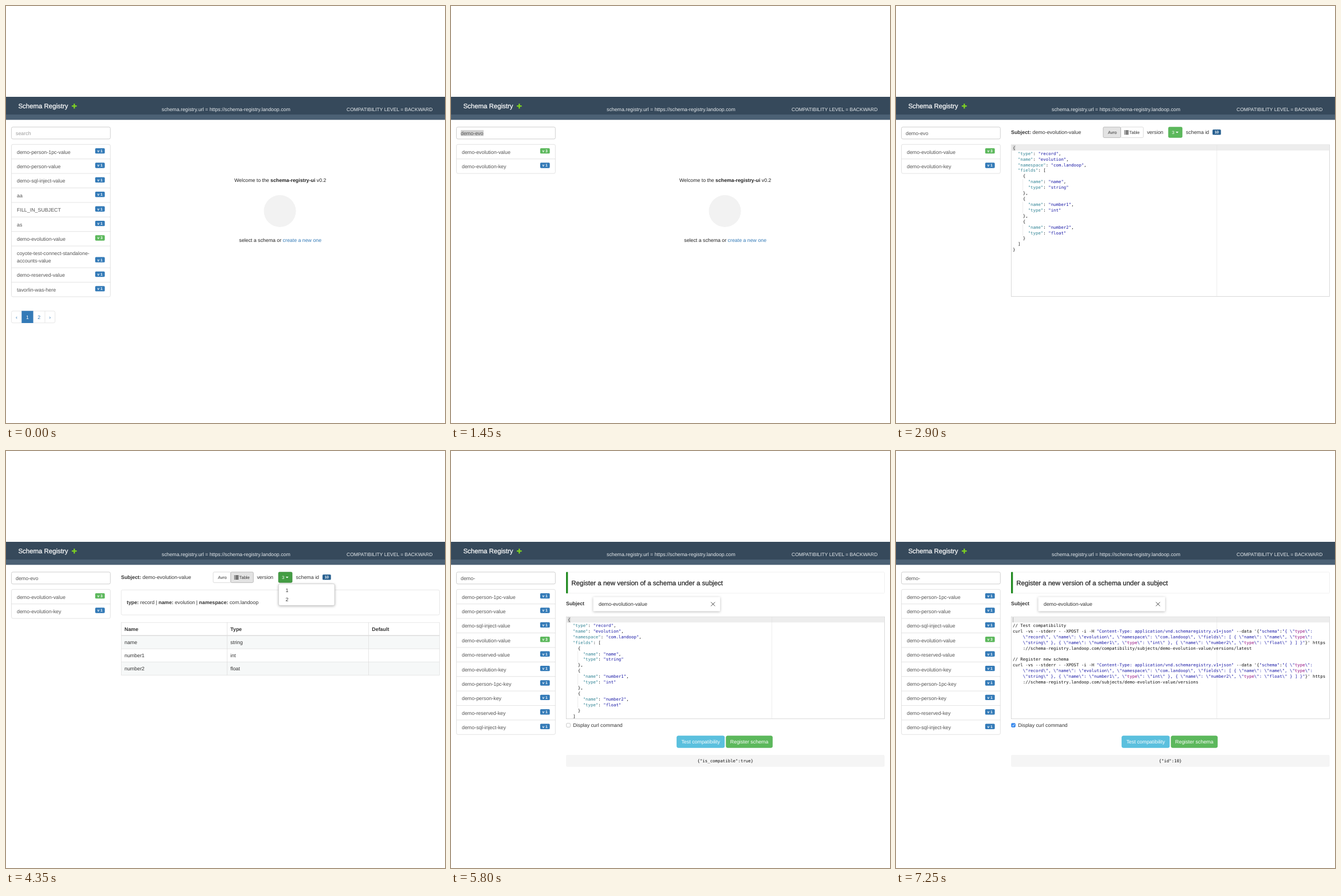
Animation, 767 px wide and 730 px high, one loop 8.7 s. Source, as an HTML page:

```html
<!DOCTYPE html>
<html lang="en">
<head>
<meta charset="utf-8">
<title>Schema Registry</title>
<style>
  html, body { margin: 0; width: 100%; height: 100%; overflow: hidden; background: #fff; }
  svg { display: block; width: 767px; height: 730px; }
  text {
    font-family: "Liberation Sans", Arial, sans-serif;
    text-rendering: geometricPrecision;
    white-space: pre;
  }
  .mono { font-family: "DejaVu Sans Mono", monospace; }
  .b { font-weight: bold; }
  .medium { stroke-width: .25px; }
  .key { fill: #318495; }
  .str { fill: #1a1aa6; }
  .word { fill: #930f80; }
  .link { fill: #337ab7; }
  .pop { filter: drop-shadow(0 1.5px 2px rgba(0, 0, 0, .28)); }
</style>
</head>
<body>
<svg id="stage" viewBox="0 0 767 730"></svg>
<script>
const STEP = 1450;
const BLUE = '#337ab7', GREEN = '#5cb85c', GREY = '#555', DARK = '#333';
const LEFT = 201, RIGHT = 757.5, MID = 479;
const ROW = 25.4, LINE = 9.917, CHAR = 4.445, MONO = 7.384;

const rect = (x1, y1, x2, y2, fill, stroke = 'none', r = 0, extra = '') =>
  `<rect x="${x1}" y="${y1}" width="${x2 - x1}" height="${y2 - y1}" rx="${r}" fill="${fill}" stroke="${stroke}" stroke-width=".7" ${extra}/>`;

const path = (d, stroke, width = .7, fill = 'none') =>
  `<path d="${d}" fill="${fill}" stroke="${stroke}" stroke-width="${width}"/>`;

const text = (x, y, s, { size = 8.89, fill = DARK, cls = '', anchor = 'start', extra = '' } = {}) =>
  `<text x="${x}" y="${y}" font-size="${size}" fill="${fill}" class="${cls}" text-anchor="${anchor}" ${extra}>${s}</text>`;

const span = (cls, s) => `<tspan class="${cls}">${s}</tspan>`;
const bold = s => span('b', s);
const mono = (x, y, s, anchor) => text(x, y, s, { size: MONO, fill: '#111', cls: 'mono', anchor });

const badge = (x1, x2, cy, s, fill) =>
  rect(x1, cy - 4.7, x2, cy + 4.7, fill, 'none', 1.6) +
  text((x1 + x2) / 2, cy + 2.4, s, { size: 6.67, fill: '#fff', cls: 'b', anchor: 'middle' });

function header() {
  return rect(0, 159, 767, 190, '#36495b') + rect(0, 190, 767, 199.3, '#4b6074') +
    text(21.5, 178.6, 'Schema Registry', { size: 11.43, fill: '#fff', cls: 'medium', extra: 'stroke="#fff"' }) +
    path('M115 175.2H123.6M119.3 170.9V179.5', '#7ed321', 2.3) +
    text(272, 184, 'schema.registry.url = https://schema-registry.landoop.com', { size: 8.8, fill: '#e8ecef' }) +
    text(745.3, 184, 'COMPATIBILITY LEVEL = BACKWARD', { size: 8.5, fill: '#e8ecef', anchor: 'end' });
}

function search(value, selected) {
  return rect(9.5, 211.9, 182.3, 232.8, '#fff', '#bbb', 2.5) +
    (selected ? rect(17, 217.3, 57, 227.6, '#d0d0d0') : '') +
    text(17, 225.7, value || 'search', { fill: value ? GREY : '#999' });
}

// Each subject may hold a line break; subjects in `versions` have a version other than 1.
function subjects(names, versions = {}) {
  let y = 242.3, body = '', rules = '';
  names.forEach((name, i) => {
    if (i) rules += `M9.5 ${y}H182.3`;
    const lines = name.split('\n');
    lines.forEach((s, k) => { body += text(19, y + 16.2 + k * 12.7, s, { fill: GREY }); });
    const v = versions[name] || 1;
    body += badge(155.8, 172.6, y + 11.3 + (lines.length - 1) * 12.7, 'v ' + v, v > 1 ? GREEN : BLUE);
    y += ROW + (lines.length - 1) * 12.7;
  });
  return rect(9.5, 242.3, 182.3, y, '#fff', '#d6d6d6', 2.5) + path(rules, '#d9d9d9') + body;
}

function pager() {
  const edges = [9.5, 27.3, 47.6, 68, 85.7];
  return rect(9.5, 534, 85.7, 554.7, '#fff', '#ddd', 2.5) +
    path('M68 534V554.7', '#ddd') + rect(27.3, 533.7, 47.6, 555, BLUE) +
    ['‹', '1', '2', '›'].map((s, i) => text((edges[i] + edges[i + 1]) / 2, 547.8, s,
      { fill: i === 1 ? '#fff' : BLUE, anchor: 'middle' })).join('');
}

function welcome() {
  return text(MID + .2, 307.9, `Welcome to the ${bold('schema-registry-ui')} v0.2`, { size: 8.75, fill: '#222', anchor: 'middle' }) +
    '<circle cx="478.5" cy="359" r="28" fill="#f2f2f2"/>' +
    text(MID + .2, 413, `select a schema or ${span('link', 'create a new one')}`, { size: 8.8, fill: '#222', anchor: 'middle' });
}

function toolbar(tableOn) {
  const button = (x1, x2, on) => rect(x1, 211.9, x2, 230.4, on ? '#e3e3e3' : '#fff', on ? '#a5a5a5' : '#ccc', 1.8);
  const avro = button(362, 392.6, !tableOn), table = button(392.6, 432.2, tableOn);
  const rows = [218.3, 220.3, 222.3, 224.3];
  return text(LEFT, 224.4, `${bold('Subject:')} demo-evolution-value`) +
    (tableOn ? avro + table : table + avro) +
    text(378, 223.8, 'Avro', { size: 7.62, anchor: 'middle' }) +
    path(rows.map(y => `M398.8 ${y}h1.5M401 ${y}h5.4`).join(''), DARK, 1.3) +
    text(407.6, 223.8, 'Table', { size: 7.62 }) +
    text(438.4, 224.4, 'version') +
    rect(476, 212, 500, 230.3, tableOn ? '#449d44' : GREEN, tableOn ? '#398439' : '#4cae4c', 1.8) +
    text(482, 223.8, '3', { size: 7.62, fill: '#fff' }) +
    path('M488.6 220h5l-2.5 2.6z', 'none', 0, '#fff') +
    text(506.6, 224.4, 'schema id') + badge(553, 567.7, 220.9, '10', '#286090');
}

const editor = (top, bottom, content) =>
  rect(LEFT + .3, top, RIGHT, bottom, '#fff', '#c8c8c8') +
  rect(LEFT + .6, top + .4, RIGHT - .3, top + 10, '#ededed') +
  path(`M560.6 ${top}V${bottom}`, '#e4e4e4') + content;

const field = (name, type) => ['    {', `      "name": "${name}",`, `      "type": "${type}"`, '    },'];
const schema = [
  '{', '  "type": "record",', '  "name": "evolution",', '  "namespace": "com.landoop",', '  "fields": [',
  ...field('name', 'string'), ...field('number1', 'int'), ...field('number2', 'float'), '  ]', '}'
];
schema[16] = '    }';

const paintJson = s => s.replace(/"[^"]*"(:?)/g, (m, colon) =>
  colon ? span('key', m.slice(0, -1)) + ':' : span('str', m));

function schemaCode(top, count) {
  const lines = schema.slice(0, count);
  const guides = lines.map((s, i) => s.startsWith('      ') ? `M221.6 ${top + .5 + i * LINE}v${LINE}` : '').join('');
  return rect(204, top + 1, 208.4, top + 9.6, 'none', '#c0c0c0') + path(guides, '#ddd', .6) +
    lines.map((s, i) => {
      const code = s.trimStart();
      return mono(204 + (s.length - code.length) * CHAR, top + 7.8 + i * LINE, paintJson(code));
    }).join('');
}

function curlCode(top) {
  const quoted = s => span('str', s.replace(/type(?=\\)/g, span('word', 'type')));
  const call = end => [
    [0, `curl -vs --stderr - -XPOST -i -H ${span('str', '"Content-Type: application/vnd.schemaregistry.v1+json"')} --data '{` +
      `${span('str', '"schema"')}:${quoted(String.raw`"{ \"type\":`)}`],
    [4, quoted(String.raw`\"record\", \"name\": \"evolution\", \"namespace\": \"com.landoop\", \"fields\": [ { \"name\": \"name\", \"type\":`)],
    [4, quoted(String.raw`\"string\" }, { \"name\": \"number1\", \"type\": \"int\" }, { \"name\": \"number2\", \"type\": \"float\" } ] }"`) + `}' https`],
    [4, '://schema-registry.landoop.com' + end]
  ];
  const lines = [
    [0, ''], [0, '// Test compatibility'], ...call('/compatibility/subjects/demo-evolution-value/versions/latest'),
    [0, ''], [0, '// Register new schema'], ...call('/subjects/demo-evolution-value/versions')
  ];
  return path(`M204.6 ${top + .8}v9`, '#999') +
    lines.map(([col, s], i) => mono(204 + col * CHAR, top + 7.8 + i * LINE, s)).join('');
}

function table() {
  const cols = [LEFT + 6, 392, 639.3];
  const data = [['name', 'string'], ['number1', 'int'], ['number2', 'float']];
  const row = (cells, y, cls) => cells.map((s, i) => text(cols[i], y, s, { cls })).join('');
  return rect(LEFT + .3, 243.2, RIGHT, 287, '#fff', '#ddd', 2.5) +
    text(211, 268.3, `${bold('type:')} record | ${bold('name:')} evolution | ${bold('namespace:')} com.landoop`, { size: 8.8 }) +
    rect(LEFT, 323, RIGHT, 346.3, '#f6f8f8') + rect(LEFT, 369.3, RIGHT, 392.3, '#f6f8f8') +
    rect(LEFT + .3, 300.2, RIGHT, 392.3, 'none', '#ddd') +
    path('M201 346.3H757.5M201 369.3H757.5M386.4 300V392.3M633.5 300V392.3', '#ddd') +
    path('M201 323H757.5', '#ddd', 1.3) +
    row(['Name', 'Type', 'Default'], 314.7, 'b') +
    data.map((cells, i) => row(cells, 338.2 + i * 23)).join('');
}

const menu = () =>
  rect(476.2, 232.6, 574.2, 270.4, '#fff', '#c4c4c4', 2.5, 'class="pop"') +
  text(488.6, 247, '1') + text(488.6, 262.8, '2');

function register(content, checked, reply) {
  const button = (x1, x2, fill, stroke, s) => rect(x1, 498.8, x2, 519.3, fill, stroke, 2.5) +
    text((x1 + x2) / 2, 512.2, s, { fill: '#fff', anchor: 'middle' });
  return rect(LEFT + .3, 212, RIGHT, 249, '#fff', '#eaeaea', 1.8) + rect(LEFT, 211.8, 204.3, 249.2, '#228b22', 'none', 1) +
    text(210.3, 234.6, 'Register a new version of a schema under a subject',
      { size: 11.5, fill: '#222', cls: 'medium', extra: 'stroke="#222"' }) +
    text(LEFT, 269.6, 'Subject', { cls: 'b' }) +
    rect(248.5, 255.4, 470.2, 280.6, '#fff', 'none', 1, 'class="pop"') +
    text(258, 271.3, 'demo-evolution-value') +
    path('M454.2 264.5l7 7m0-7l-7 7', '#444', 1) +
    editor(290.2, 468.8, content) +
    rect(201.6, 476.7, 208.4, 483.4, checked ? '#3b8cf0' : '#fff', checked ? '#2f7de0' : '#b5b5b5', 1.4) +
    (checked ? path('M203.1 480.2l1.5 1.6 2.4-3.5', '#fff', 1) : '') +
    text(213.2, 483.2, 'Display curl command', { size: 8.8 }) +
    button(394.6, 477.8, '#5bc0de', '#46b8da', 'Test compatibility') +
    button(480.7, 561.6, GREEN, '#4cae4c', 'Register schema') +
    rect(LEFT, 532, RIGHT, 552.8, '#f5f5f5', 'none', 2) + mono(MID + .3, 544.8, reply, 'middle');
}

const evolution = { 'demo-evolution-value': 3 };
const all = subjects(['demo-person-1pc-value', 'demo-person-value', 'demo-sql-inject-value', 'aa', 'FILL_IN_SUBJECT', 'as',
  'demo-evolution-value', 'coyote-test-connect-standalone-\naccounts-value', 'demo-reserved-value', 'tavorlin-was-here'], evolution);
const evo = subjects(['demo-evolution-value', 'demo-evolution-key'], evolution);
const demo = search('demo-') + subjects(['demo-person-1pc-value', 'demo-person-value', 'demo-sql-inject-value',
  'demo-evolution-value', 'demo-reserved-value', 'demo-evolution-key', 'demo-person-1pc-key', 'demo-person-key',
  'demo-reserved-key', 'demo-sql-inject-key'], evolution);

const scenes = [
  search('') + all + pager() + welcome(),
  search('demo-evo', true) + evo + welcome(),
  search('demo-evo') + evo + toolbar(false) + editor(243, 508.5, schemaCode(243, 19)),
  search('demo-evo') + evo + toolbar(true) + table() + menu(),
  demo + register(schemaCode(290.2, 18), false, '{"is_compatible":true}'),
  demo + register(curlCode(290.2), true, '{"id":10}')
];

const stage = document.getElementById('stage');
stage.innerHTML = header() + scenes.map(s => `<g class="scene">${s}</g>`).join('');

// Hard cuts: each scene is visible for exactly one step of the loop.
stage.querySelectorAll('.scene').forEach((scene, i) => {
  const n = scenes.length, easing = 'steps(1, end)';
  scene.animate([
    { opacity: i ? 0 : 1, offset: 0, easing },
    { opacity: 1, offset: i / n, easing },
    { opacity: 0, offset: (i + 1) / n, easing },
    { opacity: 0, offset: 1 }
  ], { duration: STEP * n, iterations: Infinity });
});
</script>
</body>
</html>
```
